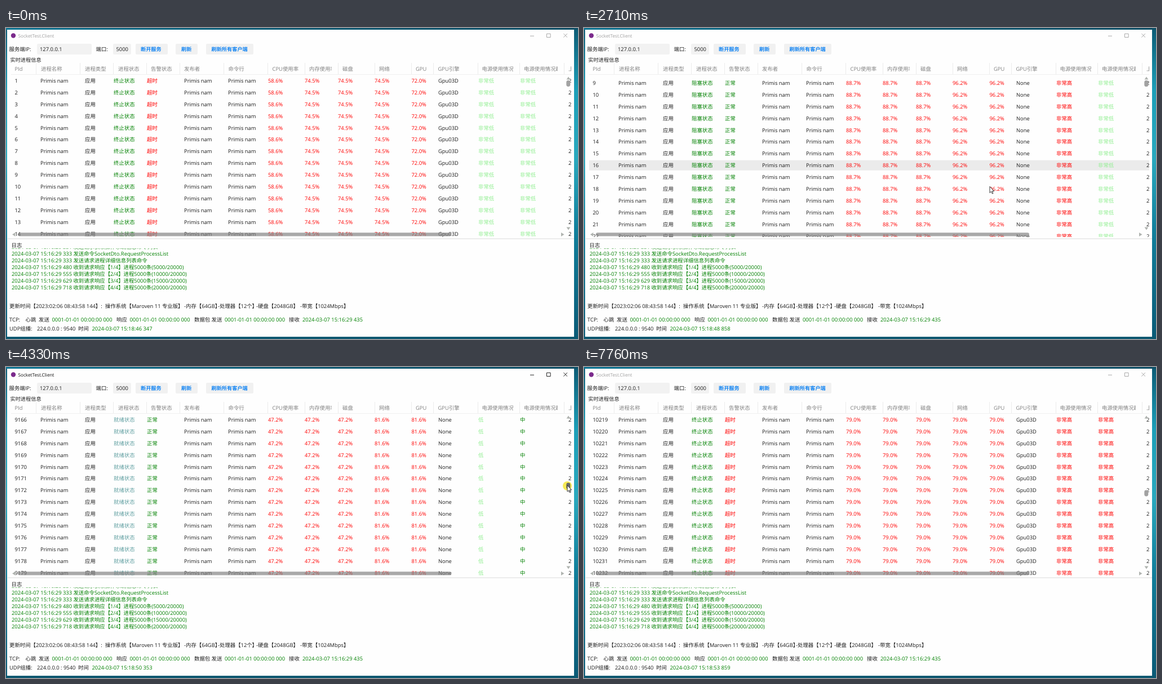
An HTML page that plays this animation: 1015 px wide and 552 px high, repeating every 7.86 s.

```html
<!DOCTYPE html>
<html lang="zh">
<head>
<meta charset="utf-8">
<title>SocketTest.Client</title>
<style>
html, body { margin: 0; width: 100%; height: 100%; overflow: hidden; background: #0b5f7c; }
svg { display: block; }
text {
  font: 9.4px "Open Sans", "Noto Sans", "Noto Sans CJK SC", "Noto Sans CJK", sans-serif;
  text-rendering: geometricPrecision;
  white-space: pre;
}
</style>
</head>
<body>
<svg id="stage" width="1015" height="552" viewBox="0 0 1015 552">
  <defs>
    <linearGradient id="top">
      <stop offset="0" stop-color="#0c7593"/><stop offset=".5" stop-color="#0b5a73"/><stop offset="1" stop-color="#0d4f66"/>
    </linearGradient>
    <linearGradient id="side" x2="0" y2="1">
      <stop offset="0" stop-color="#0c5b75"/><stop offset=".2" stop-color="#1c9fb8"/><stop offset=".42" stop-color="#2aa9be"/>
      <stop offset=".65" stop-color="#11809c"/><stop offset="1" stop-color="#0a5a76"/>
    </linearGradient>
  </defs>
</svg>
<script>
const LOOP = 7860, ROW = 20.9, TOP = 93.4;
const INK = '#1c1c1c', GREEN = '#008000', RED = '#ff0000', LIGHT = '#90ee90', ORANGE = '#ff8c00', CADET = '#5f9ea0';
const stage = document.getElementById('stage');

function add(parent, tag, attrs, content) {
  const el = document.createElementNS('http://www.w3.org/2000/svg', tag);
  for (const k in attrs) el.setAttribute(k, attrs[k]);
  if (content) el.textContent = content;
  parent.appendChild(el);
  return el;
}
const set = (el, k, v) => { if (el.getAttribute(k) !== String(v)) el.setAttribute(k, v); };
const rect = (x, y, width, height, fill, rx = 0, parent = stage) => add(parent, 'rect', { x, y, width, height, fill, rx });
const path = (d, attrs, parent = stage) => add(parent, 'path', { d, ...attrs });
// y is the middle of the line
const label = (x, y, str, fill = INK, parent = stage, style = '') =>
  add(parent, 'text', { x, y: y + 3.5, fill, style }, str);
const clipBox = (x, y, width, height) =>
  add(stage, 'svg', { x, y, width, height, viewBox: `${x} ${y} ${width} ${height}`, overflow: 'hidden' });

// Desktop and window
rect(0, 0, 1015, 552, 'url(#side)');
rect(0, 0, 1015, 3, 'url(#top)');
rect(0, 548, 1015, 4, '#0b5870');
rect(2, 3, 1006, 545, '#fefefe');
add(stage, 'circle', { cx: 13, cy: 13.5, r: 4.2, fill: '#7b2a8c' });
const title = label(21.5, 13.4, 'SocketTest.Client', INK, stage, 'font-size:8.2px');
const buttons = path('M930 14.2h7M959.5 10.2h6.6v6.4h-6.6zM989.4 10l6.6 6.6M996 10l-6.6 6.6', { fill: 'none', 'stroke-width': 1 });

// Toolbar
label(5.5, 37.5, '服务端IP:');
rect(55, 28, 97, 19, '#f2f2f2', 2);
label(60, 37.5, '127.0.0.1');
label(159.5, 37.5, '端口:');
rect(190, 28, 32, 19, '#f2f2f2', 2);
label(195.5, 37.5, '5000');
for (const [x, w, tx, str] of [[230, 57, 239, '断开服务'], [301, 39, 311, '刷新'], [355, 84, 364.5, '刷新所有客户端']]) {
  rect(x, 28, w, 19, '#f1f1f1', 2);
  label(tx, 37.8, str, '#1083f2', stage, 'font-weight:700;font-size:9.2px');
}
label(7.5, 56, '实时进程信息', INK, stage, 'font-size:9.2px');

// Table header: [text x, right separator, text]
const heads = [
  [15.5, 53, 'PId'], [62, 131, '进程名称'], [140, 190, '进程类型'], [199, 249, '进程状态'], [257, 308, '告警状态'],
  [316, 386, '发布者'], [394.5, 464, '命令行'], [472.5, 530, 'CPU使用率'], [538, 589, '内存使用率'], [597, 654, '磁盘'],
  [662, 719, '网络'], [727, 758, 'GPU'], [766.5, 837, 'GPU引擎'], [844.5, 911, '电源使用情况'],
  [919, 990, '电源使用情况趋势'], [998, 1014, '上次更新']
];
for (const [x, sep, str] of heads) {
  label(x, 72.3, str, '#808080', clipBox(x, 62, sep - 11 - x, 20));
  if (sep < 1003) rect(sep, 62, 1, 20, '#ececec');
}
rect(9, 82, 994, 1, '#efefef');

// Table rows
const cellX = [15.5, 61, 140, 191, 250, 316, 394, 465, 530, 589, 654, 719.5, 767, 838, 912, 998];
const table = clipBox(0, 83, 1003, 288);
const hoverBar = rect(9, 0, 994, 18, '#ebebeb', 0, table);
const rows = Array.from({ length: 15 }, () => {
  const g = add(table, 'g', {});
  return { g, cells: cellX.map(x => label(x, 0, '', INK, g)) };
});

// Scroll bars
rect(21, 363.3, 769, 6.2, 'rgba(130,130,130,.68)', 3);
for (const d of ['M16.5 363v7l-5.5-3.5z', 'M985 363v7l5.5-3.5z', 'M994.5 91.5h7l-3.5-5z', 'M994.5 353.5h7l-3.5 5z'])
  path(d, { fill: '#b0b4b0' });
const halo = add(stage, 'circle', { r: 8, fill: '#f2e52c', 'fill-opacity': .8 });
const thumb = rect(994.3, 0, 7, 11, '#a2a2a2', 3.4);
rect(3, 373.5, 1005, 1, '#dcdcdc');

// Log
label(9.5, 385, '日志');
const log = clipBox(0, 391.3, 1003, 80);
[
  '331 发送请求获取操作系统信息命令列表', '333 发送命令SocketDto.RequestProcessList', '333 发送请求进程详细信息列表命令',
  ...[480, 555, 629, 718].map((ms, i) => `${ms} 收到请求响应【${i + 1}/4】进程5000条(${(i + 1) * 5000}/20000)`)
].forEach((str, i) => label(10, 388 + i * 12.1, '2024-03-07 15:16:29 ' + str, GREEN, log));

// Status lines
const status = [
  [6, '更新时间【2023:02:06 08:43:58 144】:'], [176, '操作系统【Maroven 11 专业版】'], [316, '-内存【64GB】'],
  [376, '-处理器【12个】'], [444, '-硬盘【2048GB】'], [522, '-带宽【1024Mbps】']
];
for (const [x, str] of status) label(x, 493, str);
for (const [x, str] of [[6, 'TCP:'], [34.5, '心跳'], [58, '发送'], [196, '响应'], [334, '数据包 发送'], [502, '接收']])
  label(x, 517.3, str);
for (const x of [81.5, 219.5, 388]) label(x, 517.3, '0001-01-01 00:00:00 000', GREEN);
label(526, 517.3, '2024-03-07 15:16:29 435', GREEN);
label(6, 533, 'UDP组播:');
label(55, 533, '224.0.0.0 : 9540');
label(128, 533, '时间');
const clock = label(152.5, 533, '', GREEN);

// Cursor, its tip at 0,0
const cursor = path('M0 0V11.2L2.6 8.8L4.4 12.8L6 12.1L4.3 8.2H7.6Z', { fill: '#fff', stroke: '#222', 'stroke-width': .9, 'stroke-linejoin': 'round' });

// Ticks: start, clock, state, alarm, cpu/memory/disk/network/gpu, engine, power, trend
const ticks = [
  [0, '46 347', '终止', '超时', '58.6 74.5 74.5 74.5 72.0', 'Gpu03D', '非常低', '非常低'],
  [480, '46 849', '就绪', '正常', '41.3 41.3 63.8 63.8 63.8', 'None', '中', '高'],
  [980, '47 352', '就绪', '切换用户', '83.4 83.4 52.6 52.6 39.7', 'Gpu03D', '高', '非常低'],
  [1500, '47 854', '阻塞', '正常', '69.1 69.1 69.1 45.2 45.2', 'Gpu03D', '非常高', '中'],
  [2000, '48 356', '就绪', '超时', '96.2 96.2 27.9 27.9 28.1', 'None', '低', '高'],
  [2500, '48 858', '阻塞', '正常', '88.7 88.7 88.7 96.2 96.2', 'None', '非常高', '非常低'],
  [3010, '49 354', '终止', '超时', '54.8 54.8 71.5 71.5 71.5', 'None', '中', '非常低'],
  [3510, '49 850', '新建', '超限,切换用户', '90.6 90.6 60.3 60.3 60.3', 'Gpu03D', '高', '非常高'],
  [4010, '50 353', '就绪', '正常', '47.2 47.2 47.2 81.6 81.6', 'None', '低', '中'],
  [4530, '50 857', '终止', '超时', '66.4 66.4 38.9 38.9 52.3', 'None', '非常高', '低'],
  [5030, '51 360', '阻塞', '切换用户', '35.8 35.8 35.8 35.8 2.4', 'Gpu03D', '中', '高'],
  [5530, '51 858', '就绪', '超时', '72.9 72.9 59.4 59.4 85.3', 'Gpu03D', '高', '非常低'],
  [6050, '52 357', '就绪', '超时', '48.5 48.5 91.2 91.2 85.3', 'Gpu03D', '高', '非常低'],
  [6550, '52 856', '就绪', '超时', '37.7 37.7 37.7 37.7 44.1', 'None', '非常低', '非常高'],
  [7050, '53 358', '就绪', '超时', '62.1 62.1 84.6 84.6 44.1', 'None', '非常低', '非常高'],
  [7460, '53 859', '终止', '超时', '79.0 79.0 79.0 79.0 79.0', 'Gpu03D', '非常高', '非常高']
];
const levelColor = { 非常低: LIGHT, 低: LIGHT, 中: GREEN, 高: ORANGE, 非常高: RED };
const stateColor = { 终止: GREEN, 阻塞: GREEN, 就绪: CADET, 新建: CADET };

function rowCells(id, [, , state, alarm, loads, engine, power, trend]) {
  return [
    [id], ['Primis nam'], ['应用'], [state + '状态', stateColor[state]], [alarm, alarm === '正常' ? GREEN : RED],
    ['Primis nam'], ['Primis nam'], ...loads.split(' ').map(v => [v + '%', v < 10 ? LIGHT : RED]),
    [engine], [power, levelColor[power]], [trend, levelColor[trend]], ['2']
  ];
}

// Pointer: time, x, y
const moves = [
  [1900, 762, 455], [2000, 738, 365], [2100, 722, 302], [2200, 717, 283], [2300, 717, 283], [2510, 718, 282], [2810, 721, 281],
  [3010, 830, 215], [3210, 962, 122], [3410, 998, 97], [3810, 998, 97], [4010, 997, 138], [4310, 996, 210],
  [4430, 995, 224], [4630, 995, 234], [5030, 995, 223], [5130, 995, 223], [5230, 988, 230], [5430, 850, 330], [5630, 700, 470]
];
function pointerAt(t) {
  const i = moves.findIndex(m => m[0] > t);
  if (i === 0 || t >= 5730) return null;
  if (i < 0) return moves.at(-1).slice(1);
  const [a, b] = [moves[i - 1], moves[i]], k = (t - a[0]) / (b[0] - a[0]);
  return [a[1] + (b[1] - a[1]) * k, a[2] + (b[2] - a[2]) * k];
}

// The screen is refreshed about ten times a second
function snap(t) {
  const off = t < 2600 ? 0 : t < 4430 ? 10 : 30;
  return Math.floor((t - off) / 100) * 100 + off;
}

const DRAG = 3710, DROP = 5130, WHEEL = 54.4;
function scrollAt(t) {
  if (t < 2400) return 0;
  if (t < 2500) return WHEEL;
  if (t < 2710) return WHEEL * 2;
  if (t < 3810) return WHEEL * 3;
  if (t >= 5030) return 10218 * ROW;
  return Math.round(8 + (pointerAt(t)[1] - 97) / 126 * 10210) * ROW;
}

function hoverRow(t, scroll, p) {
  if (t >= 2400 && t < 2500) return 9;
  if (t >= 2500 && t < 2810) return 15;
  if (!p || p[0] > 985 || p[1] < 83 || p[1] > 370 || (t >= DRAG && t < DROP)) return -1;
  return Math.round((p[1] + 1 - TOP + scroll) / ROW);
}

function draw(now) {
  const time = now % LOOP, t = snap(time);
  const tick = ticks.findLast(k => k[0] <= time);
  const p = pointerAt(t), scroll = scrollAt(t);
  const first = Math.floor(scroll / ROW + 1e-6);

  rows.forEach(({ g, cells }, i) => {
    set(g, 'transform', `translate(0 ${(TOP + (first + i) * ROW - scroll).toFixed(2)})`);
    rowCells(String(first + i + 1), tick).forEach(([str, color = INK], c) => {
      if (cells[c].textContent !== str) cells[c].textContent = str;
      set(cells[c], 'fill', color);
    });
  });

  const hover = hoverRow(t, scroll, p);
  set(hoverBar, 'visibility', hover < 0 ? 'hidden' : 'visible');
  set(hoverBar, 'y', TOP + hover * ROW - scroll - 9);

  const thumbY = 98.5 + scroll / ROW / 10218 * 125.5;
  set(thumb, 'y', thumbY - 5.5);
  set(thumb, 'fill', t >= 3310 && t < 5430 ? '#686868' : '#a2a2a2');

  const held = t >= DRAG && t < DROP;
  set(halo, 'visibility', held ? 'visible' : 'hidden');
  set(cursor, 'visibility', p ? 'visible' : 'hidden');
  if (p) {
    set(cursor, 'transform', `translate(${p[0]} ${p[1]})`);
    set(halo, 'cx', p[0]);
    set(halo, 'cy', p[1] + 1);
  }

  const active = time >= DRAG && time < 7760;
  set(title, 'fill', active ? '#111' : '#a0a0a0');
  set(buttons, 'stroke', active ? '#222' : '#a8a8a8');
  const stamp = '2024-03-07 15:18:' + tick[1];
  if (clock.textContent !== stamp) clock.textContent = stamp;
}

function loop() {
  draw(performance.now());
  requestAnimationFrame(loop);
}
loop();
</script>
</body>
</html>
```
